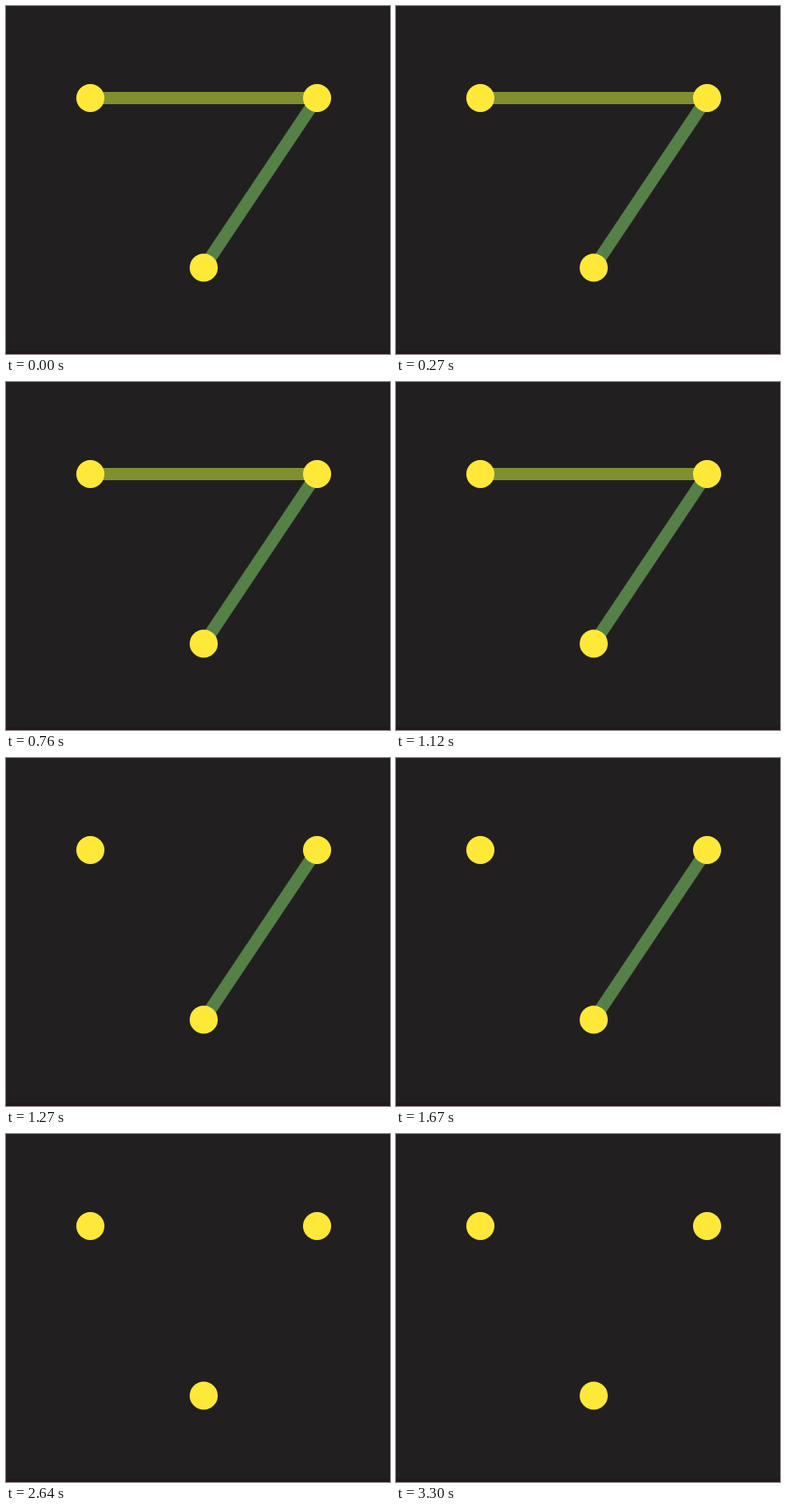
An HTML page without scripts for the animation above (5640 ms loop, 437 px wide and 397 px high).

```html
<!DOCTYPE html>
<html lang="en">
<head>
<meta charset="utf-8">
<title>Fading links</title>
<style>
  html, body {
    margin: 0;
    width: 100%;
    height: 100%;
    overflow: hidden;
    background: #221f21;
  }
  svg { display: block; width: 100%; height: 100%; }
  .link { stroke-width: 14; animation: 5640ms step-end infinite; }
  .top { stroke: #808f30; animation-name: cut-top; }
  .side { stroke: #558047; animation-name: cut-side; }
  .dots { fill: #ffe838; }

  /* cuts at 1240 ms and 2520 ms */
  @keyframes cut-top {
    0% { opacity: 1; }
    21.986%, 100% { opacity: 0; }
  }
  @keyframes cut-side {
    0% { opacity: 1; }
    44.681%, 100% { opacity: 0; }
  }
</style>
</head>
<body>
<svg viewBox="0 0 437 397">
  <rect width="437" height="397" fill="#221f21"/>
  <rect y="393" width="437" height="4" fill="#24171c"/>
  <rect x="436" width="1" height="397" fill="#1a1719"/>
  <line class="link side" x1="354" y1="105" x2="225" y2="298.5"/>
  <line class="link top" x1="96" y1="105" x2="354" y2="105"/>
  <g class="dots">
    <circle cx="96" cy="105" r="16"/>
    <circle cx="354" cy="105" r="16"/>
    <circle cx="225" cy="298.5" r="16"/>
  </g>
</svg>
</body>
</html>
```
